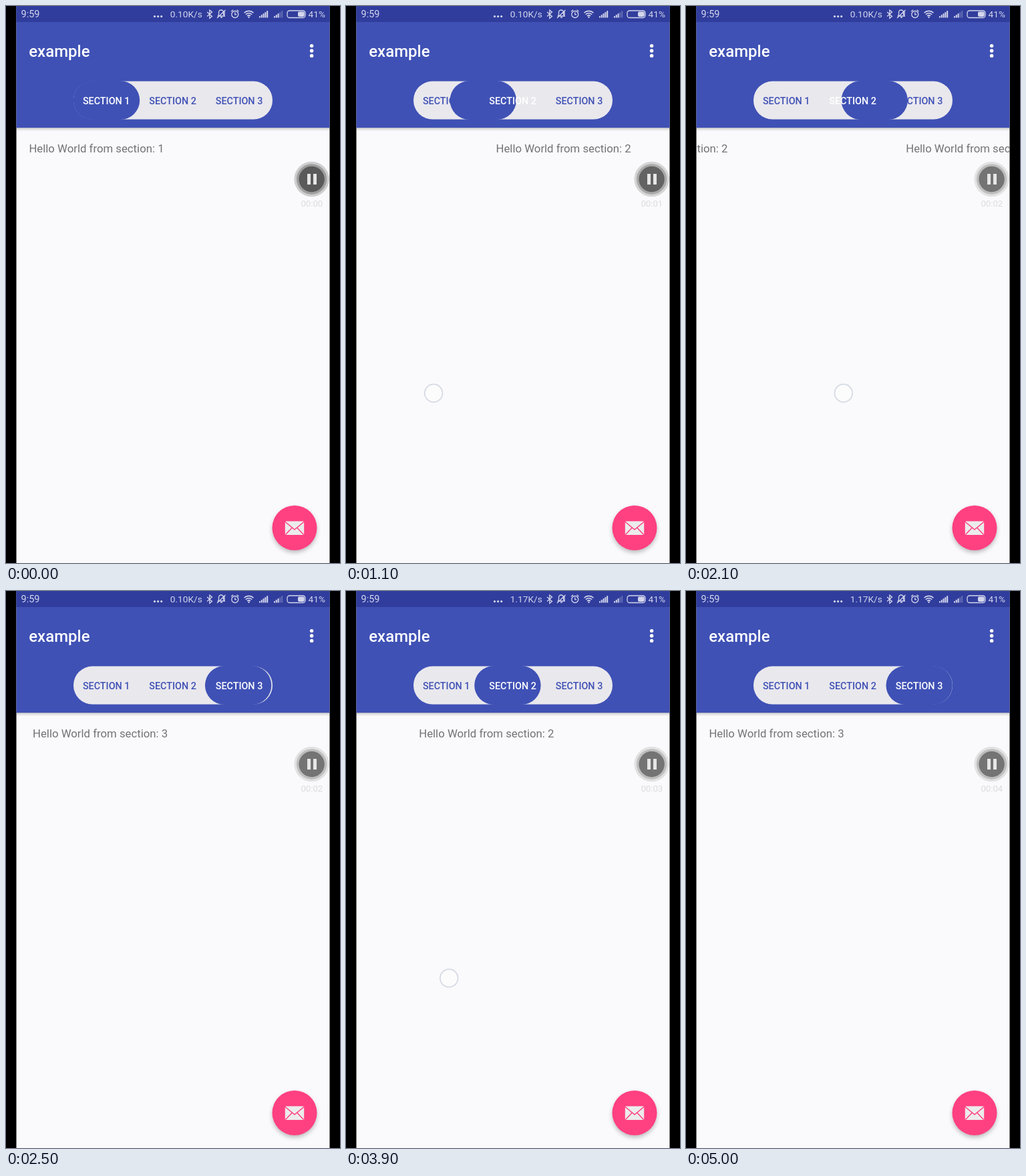
These frames come from a looping animation (500 px wide and 833 px high, 5.1 s). An HTML page:

```html
<!DOCTYPE html>
<html lang="en">
<head>
<meta charset="utf-8">
<title>Section tabs</title>
<style>
  html, body { margin: 0; width: 100%; height: 100%; overflow: hidden; background: #000; }
  svg { display: block; width: 100vw; height: 100vh; font-family: Roboto, Arial, sans-serif; }
  .status { fill: #d3d6ec; font-size: 13.7px; }
  .icon { fill: none; stroke: #d3d6ec; stroke-width: 1.3; }
  .solid { fill: #d3d6ec; }
  .title { fill: #fff; font-size: 24px; font-weight: 500; }
  .tab { font-size: 14.36px; font-weight: 500; text-anchor: middle; }
  .body { fill: #737276; font-size: 16.75px; }
  .clock { fill: #dcdbde; font-size: 13.2px; text-anchor: middle; }
</style>
</head>
<body>
<svg viewBox="0 0 500 833" preserveAspectRatio="none">
  <defs>
    <clipPath id="screen"><rect x="15.5" width="469" height="833"/></clipPath>
    <linearGradient id="shade" x2="0" y2="1">
      <stop offset="0" stop-color="#000" stop-opacity=".3"/>
      <stop offset=".4" stop-color="#000" stop-opacity=".11"/>
      <stop offset="1" stop-color="#000" stop-opacity="0"/>
    </linearGradient>
    <filter id="blur" x="-30%" y="-30%" width="160%" height="160%"><feGaussianBlur stdDeviation="3.5"/></filter>
  </defs>
  <rect width="500" height="833"/>
  <g clip-path="url(#screen)">
    <rect width="500" height="833" fill="#faf9fc"/>
    <g id="pages"></g>
    <rect y="181.5" width="500" height="6" fill="url(#shade)"/>
    <rect width="500" height="182" fill="#3f51b5"/>
    <rect width="500" height="24" fill="#303d9d"/>

    <text class="status" x="22.5" y="17.2" style="font-size:14.5px">9:59</text>
    <g class="solid">
      <circle cx="222.5" cy="15.6" r="1.6"/><circle cx="227.6" cy="15.6" r="1.6"/><circle cx="232.7" cy="15.6" r="1.6"/>
    </g>
    <text class="status" id="speed" x="293.8" y="17.2" text-anchor="end"></text>
    <g class="icon">
      <path d="M301 9l7.5 6.5L304.8 18.500V6L308.500 9L301 15.5"/>
      <path d="M317.500 15h9.500l-1.500-2.500V9.500a3.500 3.500 0 0 0-7 0v3zM321 17h3M316 18L328.500 6M327 8v8"/>
      <circle cx="342.800" cy="12.500" r="5"/>
      <path d="M342.800 9.500v3.300h2.500M337.200 8.300l2.800-2.500M348.400 8.300l-2.800-2.500"/>
      <path d="M356.500 10.200a10 10 0 0 1 14 0M358.800 12.700a6.700 6.700 0 0 1 9.400 0M361 15a3.600 3.600 0 0 1 5 0" stroke-width="1.6"/>
      <rect x="421" y="7" width="27" height="10.500" rx="3.500"/>
    </g>
    <g class="solid">
      <circle cx="363.500" cy="16.800" r="1.200"/>
      <g id="bars"></g>
      <rect x="437" y="8.600" width="9.800" height="7.300" rx="1.800"/>
    </g>
    <text class="status" x="452.500" y="17.2">41%</text>

    <text class="title" x="34.2" y="76.300">example</text>
    <g fill="#fff">
      <circle cx="457.600" cy="59.600" r="2.700"/><circle cx="457.600" cy="67" r="2.700"/><circle cx="457.600" cy="74.400" r="2.700"/>
    </g>

    <rect x="101" y="112.500" width="298" height="57" rx="28.500" fill="#e9e8ed"/>
    <rect id="pill" y="112" width="99.400" height="58" rx="29" fill="#3f51b5"/>
    <g id="tabs"></g>

    <circle cx="432" cy="784" r="33" opacity=".27" filter="url(#blur)"/>
    <circle cx="432" cy="780.500" r="33.500" fill="#ff4081"/>
    <rect x="417.800" y="770.500" width="28.400" height="20.500" rx="1.500" fill="#ececec"/>
    <path d="M418 771.500l14 11.500l14-11.500M418.500 790.500l9.500-10M445.500 790.500l-9.500-10" fill="none" stroke="#ff4081" stroke-width="1.500"/>

    <g id="button">
      <circle cx="457.600" cy="259" r="26.200" id="rim"/>
      <circle cx="457.600" cy="259" r="22.700" id="ring"/>
      <circle cx="457.600" cy="259" r="19.200" id="core"/>
      <path d="M451 251h5v16h-5zM460 251h5v16h-5z" fill="#e6e6e7"/>
    </g>
    <text class="clock" id="clock" x="457.800" y="299.700"></text>
    <circle id="touch" r="13.300" fill="#fff" fill-opacity=".5" stroke="#c3cad6" stroke-opacity=".65" stroke-width="1.800"/>
  </g>
</svg>
<script>
const LOOP = 5100, TICK = 100, PAGE = 469, TAB = 99.33;
const TAP = 4660, PILL_LAG = 16;
const $ = id => document.getElementById(id);

function add(parent, tag, attrs, text = '') {
  const el = document.createElementNS('http://www.w3.org/2000/svg', tag);
  for (const k in attrs) el.setAttribute(k, attrs[k]);
  el.textContent = text;
  return $(parent).appendChild(el);
}

const pages = [1, 2, 3].map(n => add('pages', 'text', { class: 'body', y: 219 }, 'Hello World from section: ' + n));
const tabs = [1, 2, 3].map((n, i) => add('tabs', 'text', { class: 'tab', x: 150.2 + i * 99.4, y: 146.7 }, 'SECTION ' + n));

for (const [x, lit] of [[379, 5], [401, 3]])
  for (let i = 0; i < 5; i++) {
    const h = 2.3 + i * 2;
    add('bars', 'rect', { x: x + i * 2.8, y: 17.5 - h, width: 2, height: h, opacity: i < lit ? 1 : 0.3 });
  }

// Each move: a linear drag, then a settle that slows down.
const moves = [
  { start: 880, release: 1139, end: 1739, from: 0, mid: 0.7, to: 1, x: 410 },
  { start: 1970, release: 2215, end: 2815, from: 1, mid: 1.7, to: 2, x: 410 },
  { start: 3268, release: 3410, end: 3800, from: 2, mid: 1.292, to: 1, x: 79.4 },
  { start: 3868, release: 4010, end: 4300, from: 1, mid: 0.292, to: 0, x: 79.4 },
  { start: TAP, release: TAP, end: 4960, from: 0, mid: 0, to: 2 }
];

function position(t) {
  let p = 0;
  for (const m of moves) {
    if (t < m.start) break;
    if (t < m.release) p = m.from + (m.mid - m.from) * (t - m.start) / (m.release - m.start);
    else p = m.to + (m.mid - m.to) * (1 - Math.min(1, (t - m.release) / (m.end - m.release))) ** 5;
  }
  return p;
}

function finger(t) {
  if (t >= 4560 && t < TAP) return [343, 147];
  const m = moves.find(m => m.x && t >= m.start && t < m.release);
  return m && [m.x - (position(t) - m.from) * PAGE, 579];
}

const grey = (a, b, k) => {
  const v = Math.round(a + (b - a) * k);
  return `rgb(${v},${v},${v})`;
};

function draw(t) {
  const p = position(t);
  const chosen = t >= TAP ? 2 : Math.round(p);
  pages.forEach((el, i) => el.setAttribute('x', 34.4 + (i - p) * PAGE));
  tabs.forEach((el, i) => el.setAttribute('fill', i === chosen ? '#fff' : '#3f51b5'));
  $('pill').setAttribute('x', 100.8 + position(t - PILL_LAG) * TAB);

  $('speed').textContent = t < 2600 ? '0.10K/s' : '1.17K/s';
  $('clock').textContent = '00:0' + Math.floor((t + 900) / 1000 - (t < 1100 ? (t + 900) / 1000 : 1)).toString();
  const fade = Math.max(0, Math.min(1, (t - 1000) / 300));
  $('rim').setAttribute('fill', grey(206, 226, fade));
  $('ring').setAttribute('fill', grey(158, 190, fade));
  $('core').setAttribute('fill', grey(90, 116, fade));

  const f = finger(t);
  $('touch').setAttribute('visibility', f ? 'visible' : 'hidden');
  if (f) {
    $('touch').setAttribute('cx', f[0]);
    $('touch').setAttribute('cy', f[1]);
  }
}

const origin = performance.now();
function frame() {
  const t = (performance.now() - origin) % LOOP;
  draw(Math.floor(t / TICK) * TICK);
  requestAnimationFrame(frame);
}
frame();
</script>
</body>
</html>
```
